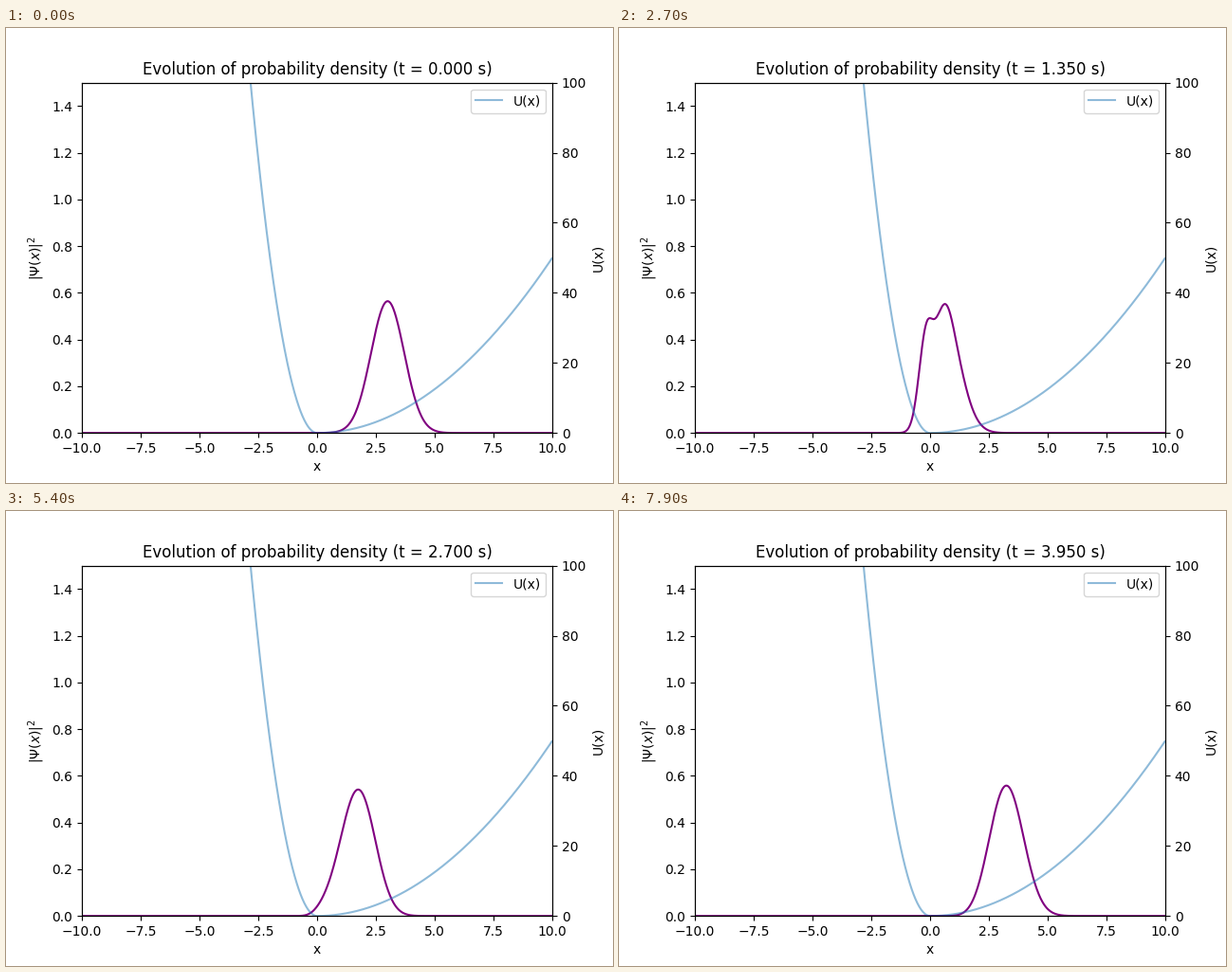
A matplotlib script for the animation above (8000 ms loop, 640x480 px).

```python
import numpy as np
import matplotlib.pyplot as plt
from matplotlib.animation import FuncAnimation

FRAMES, INTERVAL = 80, 100
DT, SUB = 0.05, 10            # time per frame, integration steps per frame
LAG = 0.02                    # the state is shown slightly after the label
W_RIGHT, W_LEFT = 1.0, 5.0    # oscillator frequencies on each side
DRIVE = 0.2
OMEGA = 2 * W_RIGHT * W_LEFT / (W_RIGHT + W_LEFT)

N = 1000
x = np.linspace(-10, 10, N, endpoint=False)
k = 2 * np.pi * np.fft.fftfreq(N, x[1] - x[0])
U = 0.5 * np.where(x < 0, W_LEFT, W_RIGHT) ** 2 * x ** 2


def propagate(psi, t, span, steps):
    """Split-operator evolution in a resonantly driven potential."""
    h = span / steps
    drift = np.exp(-0.5j * k ** 2 * h)
    for i in range(steps):
        force = DRIVE * np.sin(OMEGA * (t + (i + 0.5) * h))
        kick = np.exp(-0.5j * h * (U + force * x))
        psi = kick * np.fft.ifft(drift * np.fft.fft(kick * psi))
    return psi


def densities():
    psi = np.pi ** -0.25 * np.exp(-(x - 3) ** 2 / 2)
    psi = propagate(psi, 0, LAG, 4)
    out = []
    for i in range(FRAMES):
        out.append(np.abs(psi) ** 2)
        psi = propagate(psi, LAG + i * DT, DT, SUB)
    return out


density = densities()

fig, ax = plt.subplots(figsize=(6.4, 4.8), dpi=100)
curve, = ax.plot(x, density[0], color="purple")
ax.set(xlim=(-10, 10), ylim=(0, 1.5), xlabel="x", ylabel=r"$|\Psi(x)|^2$")
title = ax.set_title("")

ax_u = ax.twinx()
ax_u.plot(x, U, alpha=0.5, label="U(x)")
ax_u.set(ylim=(0, 100), ylabel="U(x)")
ax_u.legend(loc="upper right")


def update(i):
    curve.set_ydata(density[i])
    title.set_text(f"Evolution of probability density (t = {i * DT:.3f} s)")
    return curve, title


anim = FuncAnimation(fig, update, frames=FRAMES, interval=INTERVAL,
                     repeat=True, repeat_delay=0, blit=False)
plt.show()
```
